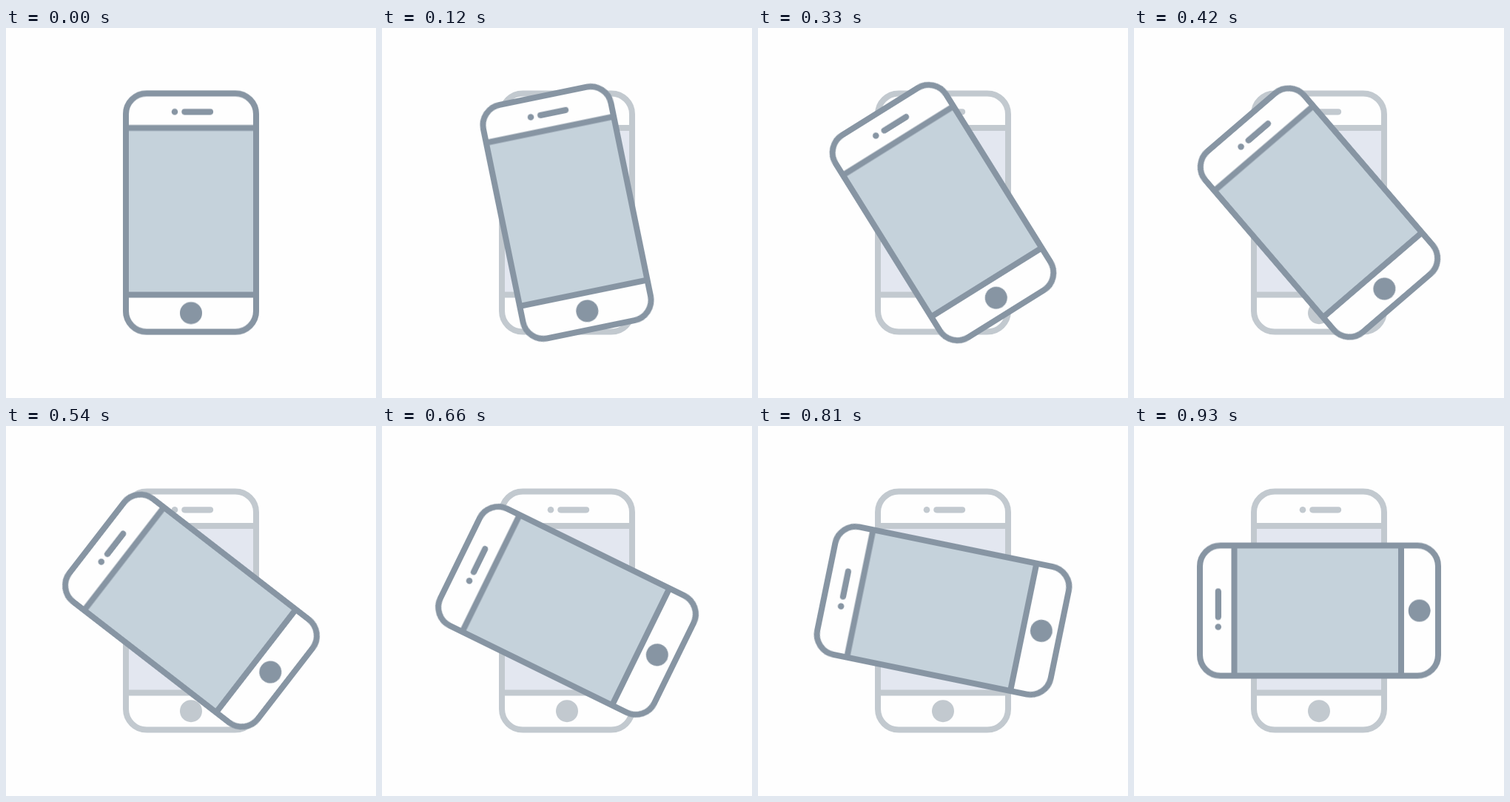
Write an HTML page that moves like this. It is 500x500 px and loops after 1800 ms.

```html
<!DOCTYPE html>
<html lang="en">
<head>
<meta charset="utf-8">
<title>Rotate phone</title>
<style>
  html, body { margin: 0; width: 100%; height: 100%; overflow: hidden; background: #fefefe; }
  svg { display: block; width: 100%; height: 100%; }
  .ghost { --line: #c2c9cf; --screen: #e3e7f0; }
  .phone { --line: #8795a3; --screen: #c5d2db; animation: turn 1800ms infinite; }
  .body { fill: #fefefe; stroke: var(--line); stroke-width: 8; }
  .screen { fill: var(--screen); }
  .rule { fill: none; stroke: var(--line); stroke-width: 8; }
  .slot { fill: none; stroke: var(--line); stroke-width: 8.2; stroke-linecap: round; }
  .dot { fill: var(--line); }
  /* quarter turn in 31 even steps of 30 ms, then hold */
  @keyframes turn {
    0% { transform: rotate(0deg); animation-timing-function: steps(31, end); }
    51.6667%, 100% { transform: rotate(-90deg); }
  }
</style>
</head>
<body>
<svg viewBox="0 0 500 500">
  <defs>
    <g id="handset">
      <rect class="body" x="-88" y="-161" width="176" height="322" rx="28"/>
      <rect class="screen" x="-84" y="-114" width="168" height="225"/>
      <path class="rule" d="M-86 -114.4H86M-86 111H86"/>
      <path class="slot" d="M-8.6 -136.2H26"/>
      <circle class="dot" cx="-22" cy="-136.2" r="4.3"/>
      <circle class="dot" cx="0" cy="135.7" r="15"/>
    </g>
  </defs>
  <g transform="translate(250 249.5)">
    <use class="ghost" href="#handset"/>
    <g class="phone"><use href="#handset"/></g>
  </g>
</svg>
</body>
</html>
```
